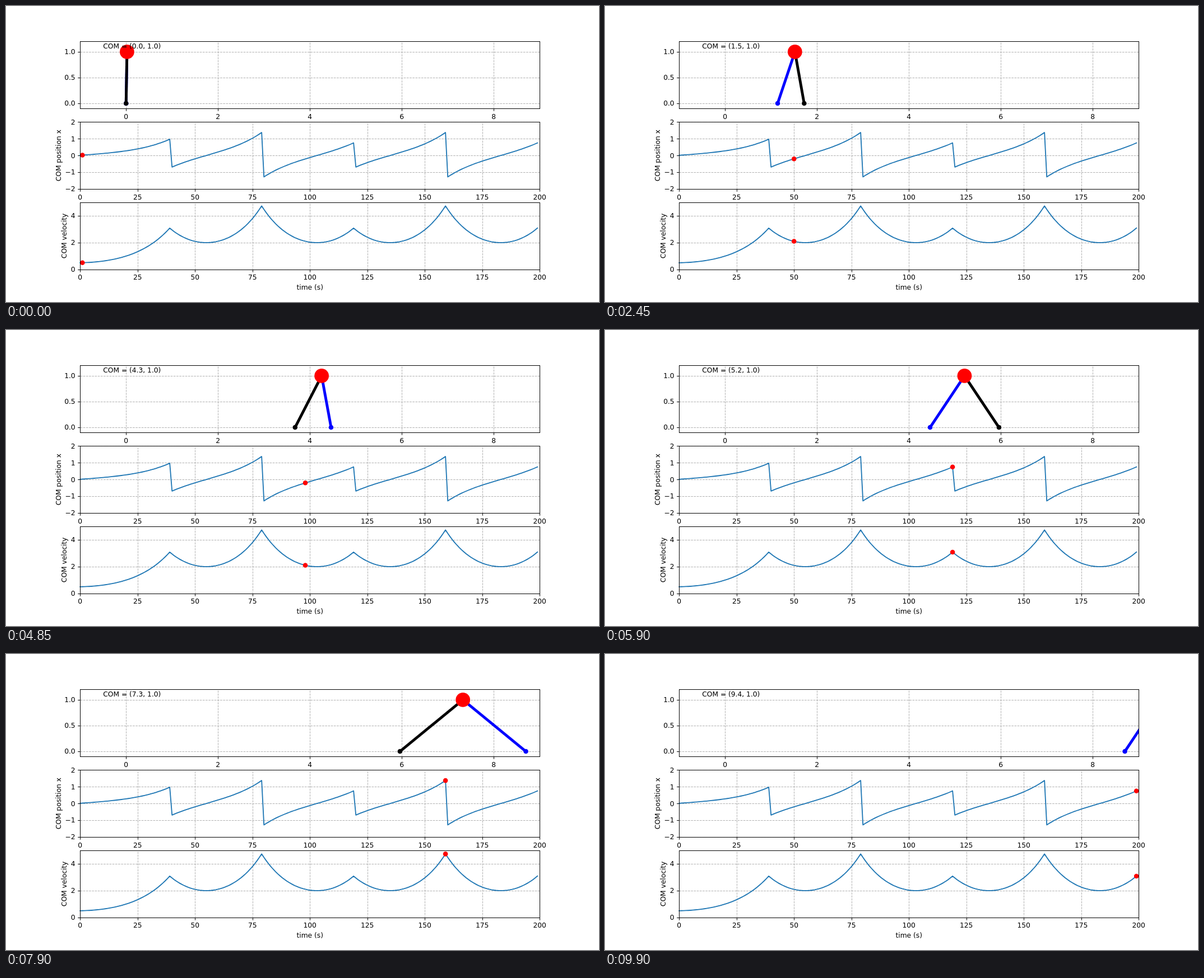
Animation of 1058x529 px, one loop 9950 ms. Source, as an HTML page:

```html
<!DOCTYPE html>
<html lang="en">
<head>
<meta charset="utf-8">
<title>Walking pendulum</title>
<style>
  html, body { margin: 0; width: 100%; height: 100%; overflow: hidden; background: #fff; }
  svg { display: block; width: 1058px; height: 529px; }
  text { font: 12.25px "DejaVu Sans", sans-serif; fill: #000; white-space: pre; }
  .mid { text-anchor: middle; }
  .end { text-anchor: end; }
  .grid { stroke: #b0b0b0; stroke-width: .98; stroke-dasharray: 3.63 1.57; }
  .axis { stroke: #000; stroke-width: .98; fill: none; }
  .curve { stroke: #1f77b4; stroke-width: 1.84; fill: none; stroke-linejoin: round; stroke-linecap: square; }
  .leg { stroke-width: 4.9; }
</style>
</head>
<body>
<svg id="stage" viewBox="0 0 1058 529"></svg>
<script>
const stage = document.getElementById('stage');
const LEFT = 132.25, RIGHT = 952.2, HEIGHT = 119.8;
const STEP = 40, COUNT = 200, FRAME = 50;

function add(tag, attrs, parent = stage, text = '') {
  const el = document.createElementNS('http://www.w3.org/2000/svg', tag);
  set(el, attrs);
  el.textContent = text;
  parent.appendChild(el);
  return el;
}
function set(el, attrs) {
  for (const k in attrs) el.setAttribute(k, attrs[k]);
}
const snap = v => Math.floor(v + .5) + .5;
const line = (cls, x1, y1, x2, y2) => add('line', { class: cls, x1, y1, x2, y2 });

// Linear inverted pendulum: x'' = w² x
const w = Math.sqrt(9.81), dt = .02, v0 = .5, vMin = 2;
const span = w * dt * STEP;
const vEnd = v0 * Math.cosh(span);
const phaseA = Math.acosh(vEnd / vMin), phaseB = span - phaseA;
const reach = p => vMin / w * Math.sinh(p);
const feet = [0, v0 / w * Math.sinh(span) + reach(phaseA)];
for (let s = 1; s < 5; s++) feet.push(feet[s] + 2 * reach(s % 2 ? phaseB : phaseA));

function state(n) {
  const s = Math.floor(n / STEP), j = n % STEP;
  const v = s ? vMin : v0;
  const p = w * dt * (j + 1) - (s ? (s % 2 ? phaseA : phaseB) : 0);
  const x = v / w * Math.sinh(p);
  const swing = s ? feet[s - 1] + (feet[s + 1] - feet[s - 1]) * j / (STEP - 1) : 0;
  const [blue, black] = s % 2 ? [swing, feet[s]] : [feet[s], swing];
  return { x, v: v * Math.cosh(p), com: feet[s] + x, blue, black };
}

function makeAxes(top, [x0, x1], [y0, y1], xTicks, yTicks) {
  const bottom = top + HEIGHT;
  const px = x => LEFT + (x - x0) / (x1 - x0) * (RIGHT - LEFT);
  const py = y => bottom - (y - y0) / (y1 - y0) * HEIGHT;
  const l = snap(LEFT), r = snap(RIGHT), t = snap(top), b = snap(bottom);
  for (const v of xTicks) {
    const x = snap(px(v));
    line('grid', x, b, x, t);
    line('axis', x, b, x, b + 4.3);
    add('text', { class: 'mid', x: px(v), y: Math.round(bottom + 18.6) }, stage, v);
  }
  for (const [v, label] of yTicks) {
    const y = snap(py(v));
    line('grid', l, y, r, y);
    line('axis', l, y, l - 4.3, y);
    add('text', { class: 'end', x: LEFT - 8.6, y: Math.round(py(v) + 4.4) }, stage, label);
  }
  const frame = () => add('rect', { class: 'axis', x: l, y: t, width: r - l, height: b - t });
  return { px, py, top, frame };
}

function plot(axes, key, label, baseline) {
  const pts = Array.from({ length: COUNT }, (_, n) =>
    axes.px(n).toFixed(2) + ',' + axes.py(state(n)[key]).toFixed(2));
  add('polyline', { class: 'curve', points: pts.join(' ') });
  const dot = add('circle', { r: 4.28, fill: '#f00' });
  axes.frame();
  const mid = axes.top + HEIGHT / 2;
  add('text', { class: 'mid', transform: `translate(${baseline} ${mid}) rotate(-90)` }, stage, label);
  return (n, s) => set(dot, { cx: axes.px(n), cy: axes.py(s[key]) });
}

// Walker
const walk = makeAxes(63.48, [-1, 9], [-.1, 1.2], [0, 2, 4, 6, 8],
  [[0, '0.0'], [.5, '0.5'], [1, '1.0']]);
const clip = add('clipPath', { id: 'area' });
add('rect', { x: LEFT, y: walk.top, width: RIGHT - LEFT, height: HEIGHT }, clip);
const body = add('g', { 'clip-path': 'url(#area)' });
const ground = walk.py(0), hip = walk.py(1);
function makeLeg(color) {
  const bone = add('line', { class: 'leg', stroke: color, y1: hip, y2: ground }, body);
  const foot = add('circle', { r: 4.28, fill: color, cy: ground }, body);
  return (com, x) => {
    set(bone, { x1: com, x2: x });
    set(foot, { cx: x });
  };
}
const blueLeg = makeLeg('#00f'), blackLeg = makeLeg('#000');
const mass = add('circle', { r: 12.86, fill: '#f00', cy: hip }, body);
walk.frame();
const caption = add('text', { x: walk.px(-.5), y: 76 });

// Curves
const times = [0, 25, 50, 75, 100, 125, 150, 175, 200];
const posAxes = makeAxes(207.24, [0, 200], [-2, 2], times,
  [[-2, '−2'], [-1, '−1'], [0, '0'], [1, '1'], [2, '2']]);
const movePos = plot(posAxes, 'x', 'COM position x', 97.8);
const velAxes = makeAxes(351, [0, 200], [0, 5], times, [[0, '0'], [2, '2'], [4, '4']]);
const moveVel = plot(velAxes, 'v', 'COM velocity', 108);
add('text', { class: 'mid', x: (LEFT + RIGHT) / 2, y: 507 }, stage, 'time (s)');

function draw(n) {
  const s = state(n), com = walk.px(s.com);
  blueLeg(com, walk.px(s.blue));
  blackLeg(com, walk.px(s.black));
  set(mass, { cx: com });
  caption.textContent = `COM = (${s.com.toFixed(1)}, 1.0)`;
  movePos(n, s);
  moveVel(n, s);
}

let start;
function tick(now) {
  start ??= now;
  draw(Math.floor((now - start) / FRAME) % (COUNT - 1) + 1);
  requestAnimationFrame(tick);
}
draw(1);
requestAnimationFrame(tick);
</script>
</body>
</html>
```
